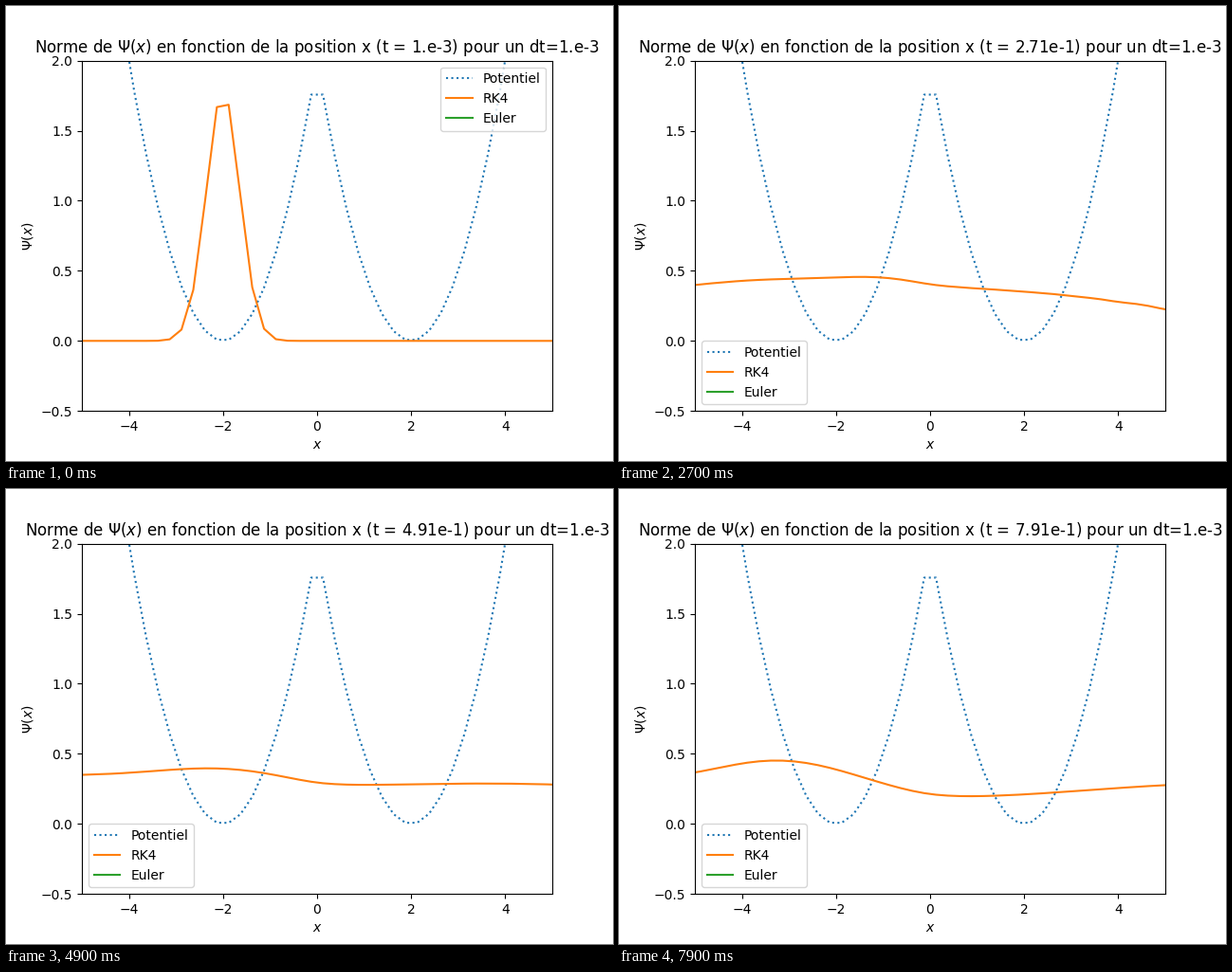
Write a matplotlib script that moves like this. It is 640x480 px and loops after 8 s.

```python
import numpy as np
import matplotlib.pyplot as plt
from matplotlib.animation import FuncAnimation

FRAMES = 80
INTERVAL = 100     # ms
DT = 1e-3
STEPS = 10         # integration steps per frame
KINETIC = 4.0      # hbar^2 / 2m
X0, SIGMA = -2.0, 0.25

x = np.linspace(-50, 50, 400)
dx = x[1] - x[0]
potential = 0.5 * (np.abs(x) - 2) ** 2


def slope(psi):
    """Time derivative of psi, with walls at both ends."""
    lap = -2 * psi
    lap[1:] += psi[:-1]
    lap[:-1] += psi[1:]
    return 1j * (KINETIC * lap / dx**2 - potential * psi)


def rk4(psi):
    k1 = slope(psi)
    k2 = slope(psi + DT / 2 * k1)
    k3 = slope(psi + DT / 2 * k2)
    k4 = slope(psi + DT * k3)
    return psi + DT / 6 * (k1 + 2 * k2 + 2 * k3 + k4)


def solve():
    """Modulus of the wave at t = DT, then every STEPS steps."""
    amp = np.sqrt(2 / (SIGMA * np.sqrt(2 * np.pi)))
    psi = rk4(amp * np.exp(-((x - X0) / (2 * SIGMA)) ** 2).astype(complex))
    waves = [np.abs(psi)]
    for _ in range(FRAMES - 1):
        for _ in range(STEPS):
            psi = rk4(psi)
        waves.append(np.abs(psi))
    return waves


def sci(value):
    return np.format_float_scientific(round(value, 3), exp_digits=1)


waves = solve()

fig, ax = plt.subplots(figsize=(6.4, 4.8), dpi=100)
ax.plot(x, potential, ":", label="Potentiel")
wave_line, = ax.plot(x, waves[0], label="RK4")
ax.plot([], [], label="Euler")
ax.set_xlim(-5, 5)
ax.set_ylim(-0.5, 2)
ax.set_xlabel("$x$")
ax.set_ylabel(r"$\Psi(x)$")
ax.legend(loc="best")
title = ax.set_title("")


def update(i):
    t = DT * (1 + STEPS * i)
    wave_line.set_ydata(waves[i])
    title.set_text(r"Norme de $\Psi(x)$ en fonction de la position x "
                   f"(t = {sci(t)}) pour un dt={sci(DT)}")
    return wave_line, title


anim = FuncAnimation(fig, update, frames=FRAMES, interval=INTERVAL,
                     repeat=True, repeat_delay=0, blit=False)
plt.show()
```
